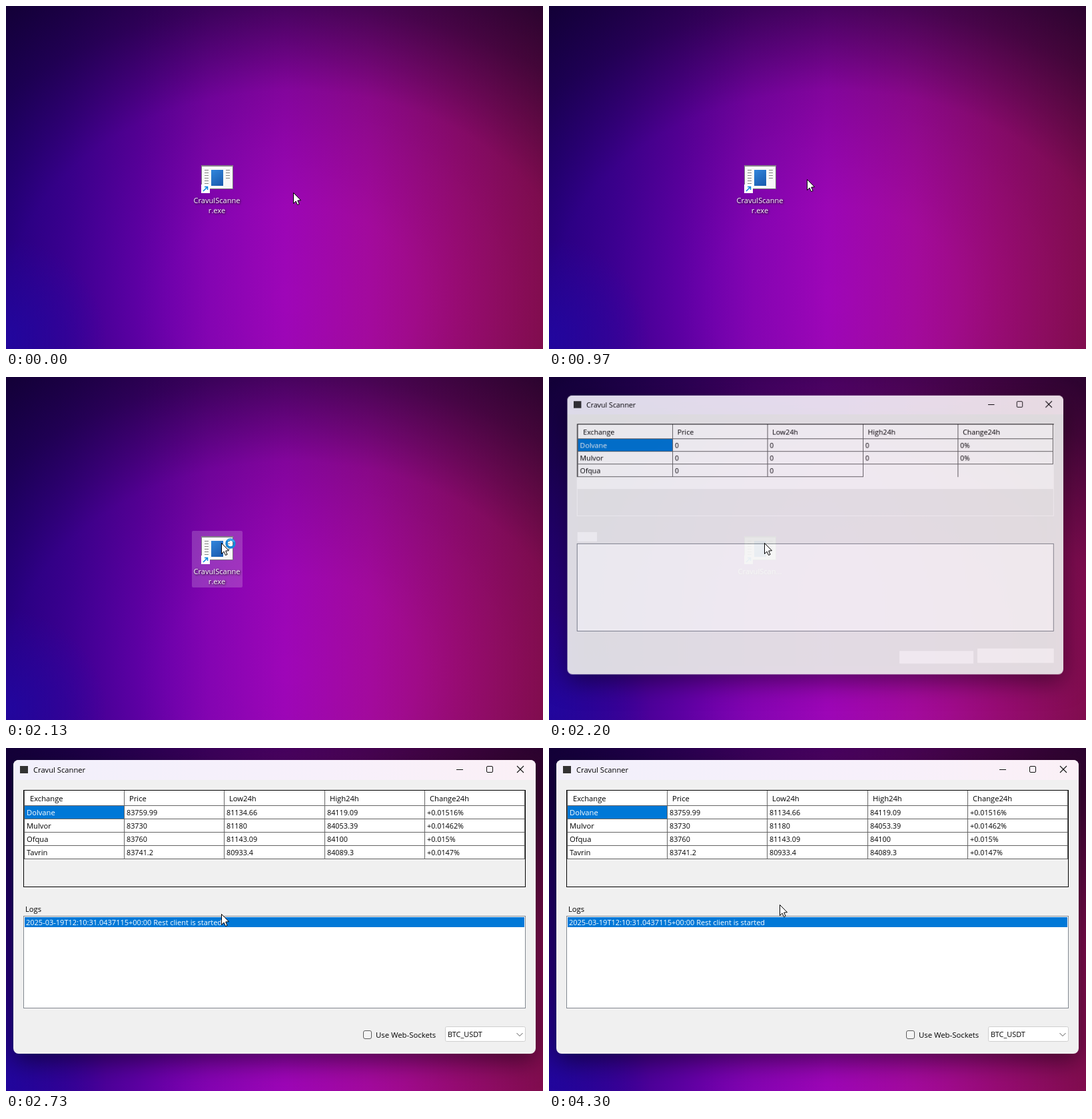
Write an HTML page with a canvas that moves like this. It is 806 px wide and 515 px high and loops after 8 s.

```html
<!DOCTYPE html>
<html lang="en">
<head>
<meta charset="utf-8">
<title>Desktop tracker</title>
<style>
  html, body { margin: 0; width: 100%; height: 100%; overflow: hidden; background: #14003a; }
  canvas { display: block; width: 806px; height: 515px; }
</style>
</head>
<body>
<canvas id="stage" width="806" height="515"></canvas>
<script>
const W = 806, H = 515, LOOP = 8000;
const FONT = '"Open Sans", "Noto Sans", sans-serif';
const APP = 'Cravul Scanner';
const BLUE = '#0078d7';
const HEADERS = ['Exchange', 'Price', 'Low24h', 'High24h', 'Change24h'];
const ROWS = [
  ['Dolvane', '83759.99', '81134.66', '84119.09', '+0.01516%'],
  ['Mulvor', '83730', '81180', '84053.39', '+0.01462%'],
  ['Ofqua', '83760', '81143.09', '84100', '+0.015%'],
  ['Tavrin', '83741.2', '80933.4', '84089.3', '+0.0147%']
];
const EMPTY = ['', '0', '0', '0', '0%'];
const COLS = [27, 177, 327, 478, 628, 778];

const clamp = v => Math.min(1, Math.max(0, v));
const easeOut = p => 1 - (1 - p) ** 3;

function layer() {
  const c = document.createElement('canvas');
  c.width = W;
  c.height = H;
  return c.getContext('2d');
}

function box(g, x, y, w, h, fill) {
  g.fillStyle = fill;
  g.fillRect(x, y, w, h);
}

function frame(g, x, y, w, h, color) {
  g.strokeStyle = color;
  g.lineWidth = 1;
  g.strokeRect(x + 0.5, y + 0.5, w - 1, h - 1);
}

function text(g, str, x, y, color = '#000', size = 11.2) {
  g.font = `${size}px ${FONT}`;
  g.fillStyle = color;
  g.fillText(str, x, y);
}

function line(g, points, color, width = 1) {
  g.beginPath();
  points.forEach(([x, y]) => g.lineTo(x, y));
  g.strokeStyle = color;
  g.lineWidth = width;
  g.stroke();
}

function rounded(g, x, y, w, h, r) {
  g.beginPath();
  g.roundRect(x, y, w, h, r);
}

function stops(gradient, list) {
  list.forEach(([at, color]) => gradient.addColorStop(at, color));
  return gradient;
}

function paintWallpaper() {
  const g = layer();
  box(g, 0, 0, W, H, stops(g.createLinearGradient(0, 0, W, 0), [
    [0, '#2c0098'], [0.12, '#4200a0'], [0.25, '#6200aa'], [0.38, '#8604b4'],
    [0.52, '#9e06b8'], [0.68, '#a50a9e'], [0.84, '#a00c78'], [1, '#960f56']
  ]));
  g.save();
  g.translate(430, 440);
  g.scale(1.35, 1);
  const dark = a => `rgba(14,0,36,${a})`;
  box(g, -500, -500, 1000, 1000, stops(g.createRadialGradient(0, 0, 0, 0, 0, 560), [
    [0, dark(0)], [0.25, dark(0.02)], [0.43, dark(0.11)], [0.56, dark(0.19)],
    [0.65, dark(0.36)], [0.79, dark(0.61)], [0.97, dark(0.84)], [1, dark(0.87)]
  ]));
  g.restore();
  box(g, 0, 340, 160, 175, stops(g.createRadialGradient(0, 500, 0, 0, 500, 150), [
    [0, 'rgba(32,8,168,.75)'], [1, 'rgba(32,8,168,0)']
  ]));
  return g.canvas;
}

function drawLabel(g, lines) {
  g.save();
  g.textAlign = 'center';
  g.shadowColor = '#000';
  g.shadowBlur = 3;
  g.shadowOffsetX = g.shadowOffsetY = 1;
  lines.forEach((s, i) => text(g, s, 316.5, 296 + 15 * i, '#fff', 11.1));
  g.restore();
}

function drawShortcut(g, hover, short) {
  if (hover) {
    rounded(g, 279, 231, 76, 85, 2);
    g.fillStyle = 'rgba(255,255,255,.19)';
    g.fill();
  }
  box(g, 293, 239, 48, 36, '#f8f8f8');
  frame(g, 293, 239, 48, 36, '#77727c');
  box(g, 293, 239, 48, 2, '#85818a');
  for (let i = 0; i < 6; i++) {
    box(g, 298, 246 + 4 * i, 6, 1, '#858585');
    if (i < 4) box(g, 330, 246 + 4 * i, 6, 1, '#858585');
  }
  box(g, 308, 246, 18, 24, stops(g.createLinearGradient(308, 246, 326, 270), [
    [0, '#3186dc'], [1, '#1859ac']
  ]));
  box(g, 293, 268, 13, 13, '#fff');
  line(g, [[296, 278], [302, 272]], '#0a84e0', 1.6);
  line(g, [[298, 271.5], [302.5, 271.5], [302.5, 276]], '#0a84e0', 1.6);
  const name = APP.replace(' ', '');
  drawLabel(g, short ? [name.slice(0, 10) + '...'] : [name.slice(0, 12), name.slice(12) + '.exe']);
}

function drawTitleBar(g) {
  box(g, 11, 18, 784, 30, stops(g.createLinearGradient(11, 0, 795, 0), [
    [0, '#f2f0fb'], [0.6, '#f7f0fb'], [1, '#fbf0f6']
  ]));
  box(g, 21, 27, 12, 11, '#333');
  text(g, APP, 41, 37);
  line(g, [[676, 32.5], [686, 32.5]], '#111');
  rounded(g, 721.5, 27.5, 9, 9, 1.5);
  g.stroke();
  line(g, [[767, 27], [777, 37]], '#111', 1.1);
  line(g, [[777, 27], [767, 37]], '#111', 1.1);
}

function drawGrid(g, partial, filledRows) {
  const gray = '#646464';
  const rowsShown = partial ? 3 : 4;
  box(g, 27, 64, 752, 102, '#fff');
  frame(g, 26, 63, 754, 146, partial ? '#fff' : '#000');
  box(g, 26, 63, 754, 1, '#000');
  if (partial) box(g, 26, 63, 1, 84, gray);
  HEADERS.forEach((h, i) => text(g, h, [36, 185, 335, 486, 636][i], 80));
  for (let r = -1; r < rowsShown; r++) {
    const top = r < 0 ? 64 : 86 + 20 * r;
    const bottom = 86 + 20 * (r + 1);
    const cut = partial && r === 2;
    COLS.forEach((x, i) => {
      if (!(cut && i === 5)) box(g, x, top, 1, bottom - top + 1, gray);
    });
    box(g, 27, bottom, (cut ? COLS[3] : COLS[5]) - 26, 1, gray);
  }
  box(g, 28, 87, 149, 19, BLUE);
  ROWS.slice(0, rowsShown).forEach((row, r) => row.forEach((value, c) => {
    if (partial && r === 2 && c > 2) return;
    const shown = c === 0 || r < filledRows ? value : EMPTY[c];
    const x = [31, 181, 331, 482, 632][c];
    text(g, shown, x, 101 + 20 * r, r + c ? '#000' : '#fff', c ? 10.8 : 11.2);
  }));
}

function drawControls(g, partial, logged) {
  box(g, 26, 252, 754, 139, '#fff');
  frame(g, 26, 252, 754, 139, '#828790');
  if (partial) {
    box(g, 27, 234, 31, 15, '#fff');
    box(g, 536, 422, 117, 20, '#fff');
    box(g, 659, 418, 121, 23, '#fff');
    return;
  }
  text(g, 'Logs', 29, 246);
  if (logged) {
    box(g, 28, 254, 750, 15, BLUE);
    text(g, '2025-03-19T12:10:31.0437115+00:00 Rest client is started', 30, 266, '#fff', 11);
  }
  rounded(g, 536.5, 424.5, 12, 12, 2.5);
  g.fillStyle = '#f5f5f5';
  g.fill();
  g.strokeStyle = '#5c5c5c';
  g.lineWidth = 1;
  g.stroke();
  text(g, 'Use Web-Sockets', 555, 435, '#000', 11.35);
  rounded(g, 659.5, 418.5, 120, 22, 2);
  g.fillStyle = '#fff';
  g.fill();
  g.strokeStyle = '#cfcfcf';
  g.stroke();
  text(g, 'BTC_USDT', 663, 434, '#000', 10.9);
  line(g, [[766.5, 428], [771, 432.5], [775.5, 428]], '#555');
}

function paintWindow(g, t) {
  const partial = t < 2230;
  const filledRows = t >= 2730 ? 4 : t >= 2670 ? 2 : 0;
  g.clearRect(0, 0, W, H);
  g.save();
  rounded(g, 11, 18, 784, 441, 8);
  g.clip();
  box(g, 11, 18, 784, 441, '#f0f0f0');
  drawTitleBar(g);
  drawGrid(g, partial, filledRows);
  drawControls(g, partial, t >= 2600);
  g.restore();
}

function drawWindow(g, t) {
  const age = t - 2150;
  if (age <= 0) return;
  paintWindow(panel, t);
  const scale = 0.9 + 0.1 * easeOut(clamp(age / 250));
  g.save();
  g.globalAlpha = clamp(age / 56);
  g.translate(338, 210);
  g.scale(scale, scale);
  g.translate(-338, -210);
  g.shadowColor = 'rgba(0,0,0,.5)';
  g.shadowBlur = 36;
  g.shadowOffsetY = 12;
  g.drawImage(panel.canvas, 0, 0);
  g.restore();
}

// Pointer stops: time, x, y
const PATH = [[740, 431, 280], [970, 387, 260], [1270, 331, 250], [1370, 323, 249],
  [3970, 323, 249], [4300, 346, 235]];

function pointerAt(t) {
  if (t <= PATH[0][0]) return PATH[0].slice(1);
  const i = PATH.findIndex(p => p[0] > t);
  if (i < 0) return PATH[PATH.length - 1].slice(1);
  const [t0, x0, y0] = PATH[i - 1], [t1, x1, y1] = PATH[i];
  const p = (t - t0) / (t1 - t0);
  return [Math.round(x0 + (x1 - x0) * p), Math.round(y0 + (y1 - y0) * p)];
}

function drawPointer(g, x, y, busy) {
  g.save();
  g.translate(x + 0.5, y + 0.5);
  g.beginPath();
  [[0, 0], [0, 16], [3.6, 12.6], [6, 18], [8.6, 17], [6.2, 11.6], [11, 11.2]]
    .forEach(([px, py]) => g.lineTo(px, py));
  g.closePath();
  g.fillStyle = '#fff';
  g.fill();
  g.strokeStyle = '#000';
  g.lineWidth = 1;
  g.stroke();
  if (busy) {
    g.beginPath();
    g.arc(13.5, 0.5, 6, 0, Math.PI * 2);
    g.strokeStyle = '#1787d8';
    g.lineWidth = 3.4;
    g.stroke();
    g.beginPath();
    g.arc(13.5, 0.5, 6, -2.4, -0.4);
    g.strokeStyle = '#45aef0';
    g.lineWidth = 2;
    g.stroke();
  }
  g.restore();
}

const stage = document.getElementById('stage').getContext('2d');
const panel = layer();
const wallpaper = paintWallpaper();

function render(t) {
  const [x, y] = pointerAt(t);
  const opened = t > 2150;
  stage.drawImage(wallpaper, 0, 0);
  drawShortcut(stage, x < 355 && !opened, opened);
  drawWindow(stage, t);
  drawPointer(stage, x, y, t >= 1730 && !opened);
}

const start = performance.now();
function tick() {
  render((performance.now() - start) % LOOP);
  requestAnimationFrame(tick);
}
tick();
</script>
</body>
</html>
```
